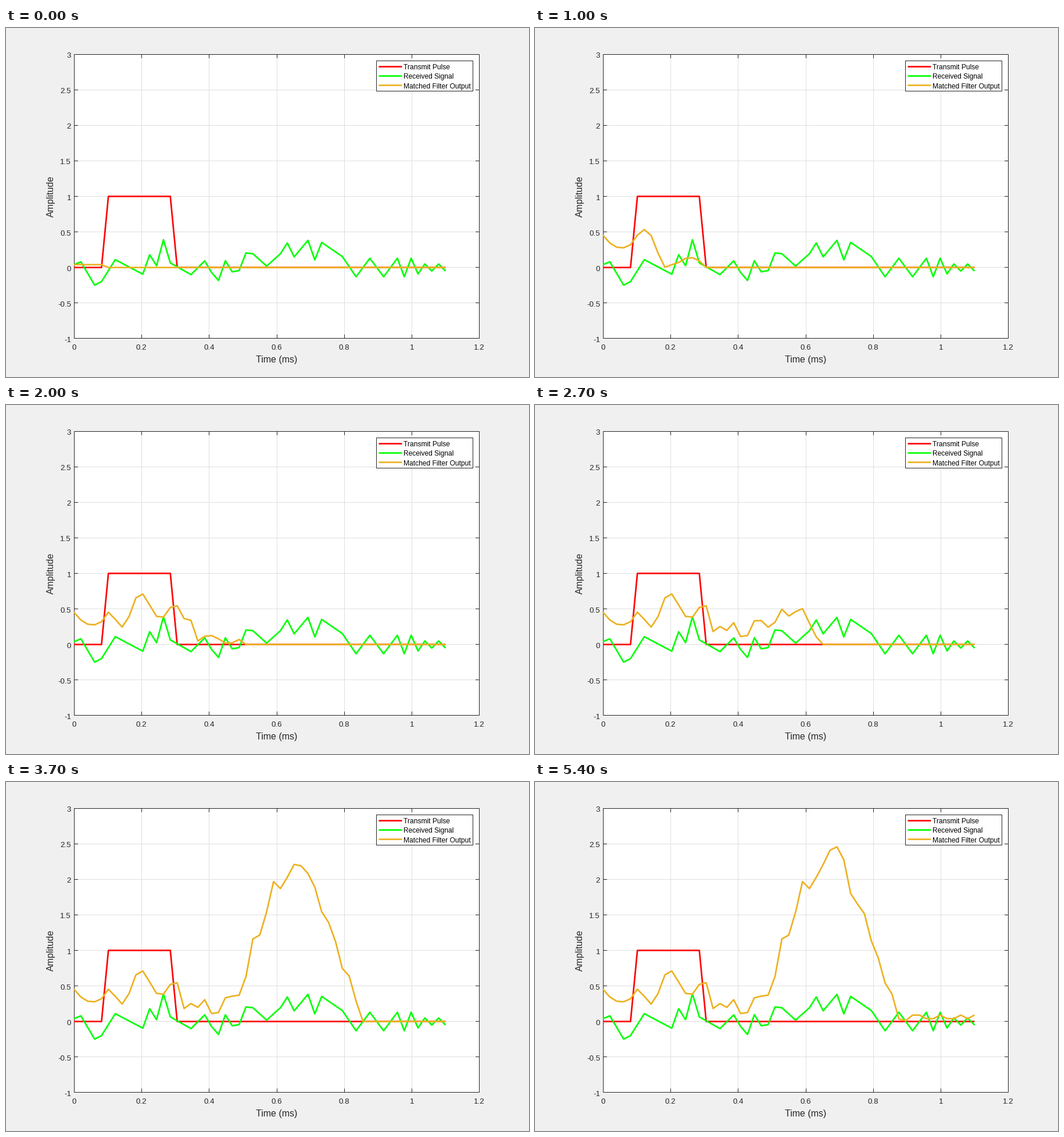
Animation, 900 px wide and 600 px high, one loop 5.5 s. Source, as a matplotlib script:

```python
import numpy as np
import matplotlib.pyplot as plt
from matplotlib.animation import FuncAnimation
from matplotlib.patches import Rectangle

W, H, DPI = 900, 600, 100
X0, Y0 = 117, 411.75               # pixel position of the data origin
SX, SY = 581.25, 122.25            # pixels per unit
LEFT, RIGHT, TOP, BOTTOM = 117.5, 814.5, 45.5, 533.5
TICK = 6.5
INK, GRID = "#262626", "#dfdfdf"
RED, GREEN, AMBER = "#ff0000", "#00ff00", "#edb120"
THICK = 2.67

plt.rcParams["font.family"] = "Liberation Sans"
plt.rcParams["path.snap"] = False

N = 55
index = np.arange(N)
time = np.linspace(0, 1.1, N)
pulse = ((index >= 5) & (index < 15)).astype(float)


def echo():
    """Slow drift with a weak echo, plus a ripple that flips at each turn."""
    drift = [(0, -.09), (1, -.05), (3, -.17), (6, -.02), (11, .05),
             (13, .26), (14, 0), (17, .03), (20, -.07), (24, 0),
             (26, .15), (30, .15), (32, .28), (39, .18), (41, 0)]
    turns = np.r_[1, 3.5, 6, 10:14, 17:22:2, 22, 23.5, 25, 28, 31, 32,
                  34:37, 41:47:2, 47:55]
    swing = np.interp(turns, [49, 51], [.13, .05])
    swing[1::2] *= -1
    return np.interp(index, *zip(*drift)) + np.interp(index, turns, swing)


received = echo()


def matched_filter(count):
    """Filter magnitude when only the first samples have arrived."""
    heard = np.where(index < count, received, 0)
    return np.abs(np.convolve(heard, np.ones(10)))[5:5 + N]


def px(width):
    return width * 72 / DPI


def to_x(t):
    return X0 + SX * np.asarray(t)


def to_y(v):
    return Y0 - SY * np.asarray(v)


fig = plt.figure(figsize=(W / DPI, H / DPI), dpi=DPI, facecolor="#f0f0f0")
ax = fig.add_axes([0, 0, 1, 1])
ax.set(xlim=(0, W), ylim=(H, 0))
ax.axis("off")


def stroke(xs, ys, color, width=1, z=2):
    line, = ax.plot(xs, ys, color=color, lw=px(width), zorder=z,
                    solid_capstyle="butt", solid_joinstyle="round")
    return line


def label(x, y, text, size, ha="center", color=INK, **kw):
    ax.text(x, y, text, fontsize=px(size), ha=ha, va="baseline",
            color=color, zorder=9, **kw)


def box(x, y, x2, y2, z, **kw):
    ax.add_patch(Rectangle((x, y), x2 - x, y2 - y, zorder=z, lw=px(1), **kw))


# Plot area, grid, ticks and tick labels
box(LEFT, TOP, RIGHT, BOTTOM, 0, fc="white", ec="none")
for t in np.arange(7) / 5:
    x = np.floor(to_x(t) + .49) + .5
    if 0 < t < 1.2:
        stroke([x, x], [TOP, BOTTOM], GRID, z=1)
        stroke([x, x], [TOP, TOP + TICK], INK)
        stroke([x, x], [BOTTOM, BOTTOM - TICK], INK)
    label(to_x(t), 553, f"{t:g}", 13.33)
for v in np.arange(-2, 7) / 2:
    y = np.floor(to_y(v)) + .5
    if -1 < v < 3:
        stroke([LEFT, RIGHT], [y, y], GRID, z=1)
        stroke([LEFT, LEFT + TICK], [y, y], INK)
        stroke([RIGHT, RIGHT - TICK], [y, y], INK)
    label(112, np.round(to_y(v)) + 6, f"{v:g}", 13.33, ha="right")
box(LEFT, TOP, RIGHT, BOTTOM, 3, fc="none", ec=INK)
label(465.75, 575, "Time (ms)", 16)
label(82, 289.5, "Amplitude", 16, rotation=90, rotation_mode="anchor")

# Data lines
stroke(to_x(time), to_y(pulse), RED, THICK, 4)
stroke(to_x(time), to_y(received), GREEN, THICK, 5)
output = stroke(to_x(time), to_y(matched_filter(1)), AMBER, THICK, 6)

# Legend
box(637.5, 56.5, 803.5, 108.5, 7, fc="white", ec=INK)
entries = [("Transmit Pulse", RED), ("Received Signal", GREEN),
           ("Matched Filter Output", AMBER)]
for row, (name, color) in enumerate(entries):
    y = 66.5 + 16 * row
    stroke([641.5, 681.5], [y, y], color, THICK, 8)
    label(684, 71 + 16.4 * row, name, 12, ha="left", color="black")


def update(frame):
    output.set_ydata(to_y(matched_filter(frame + 1)))
    return output,


anim = FuncAnimation(fig, update, frames=N, interval=100, repeat=True,
                     repeat_delay=0)
plt.show()
```
